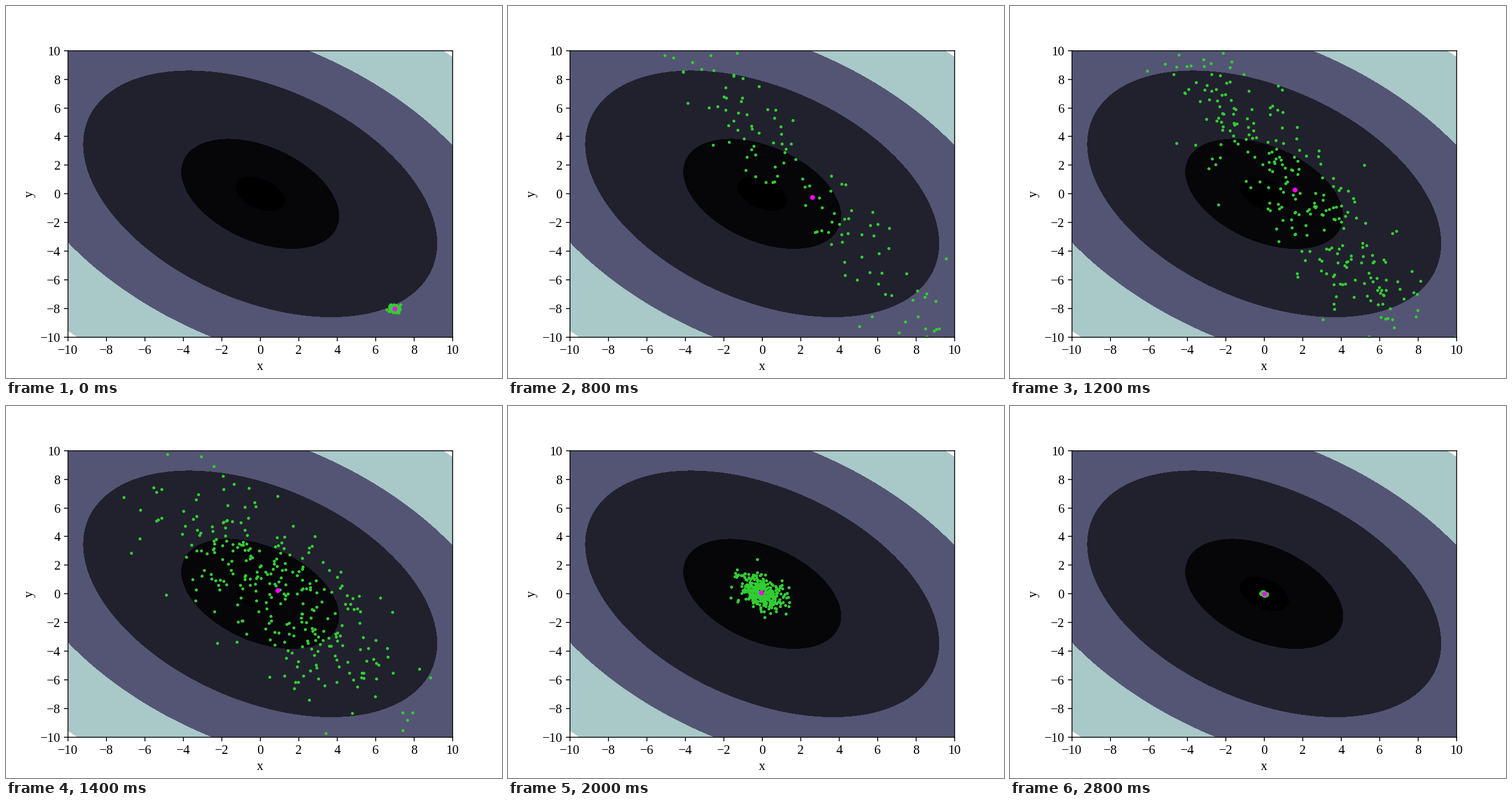
A matplotlib script for the animation above (3 s loop, 864 by 648 pixels).

```python
import numpy as np
import matplotlib.pyplot as plt
from matplotlib.animation import FuncAnimation

plt.rcParams.update({
    "font.family": "Liberation Serif",
    "font.size": 12,
    "axes.unicode_minus": True,
})

POPULATION = 300
GENERATIONS = 15
STEP_MS = 200

# Key generations: the search starts small, stretches, then closes in
KEYS = [0, 2, 4, 6, 8, 10, 14]
MEAN_X = [7, 6.5, 2.6, 1.58, 0.22, -0.05, 0]
MEAN_Y = [-8, -7.1, -0.25, 0.28, 0.25, 0.07, 0]
SPREAD = [0.11, 4.5, 18, 7.5, 2.2, 0.66, 0.06]
ASPECT = [1, 0.55, 0.6, 0.6, 0.95, 1, 1.1]
CORRELATION = [-0.1, -0.97, -0.993, -0.94, -0.5, -0.5, -0.4]


def cost(x, y):
    return 0.7 * x**2 + 0.6 * x * y + 0.8 * y**2


def at(i, values):
    return np.interp(i, KEYS, values)


def mean(i):
    return at(i, MEAN_X), at(i, MEAN_Y)


def sample(i):
    """Draw the population of generation i from a correlated normal."""
    mx, my = mean(i)
    rho = at(i, CORRELATION)
    sy = np.exp(at(i, np.log(SPREAD)))
    sx = sy * at(i, ASPECT)
    u, v = np.random.default_rng(40 + i).standard_normal((2, POPULATION))
    return mx + sx * (rho * v + np.sqrt(1 - rho**2) * u), my + sy * v


fig, ax = plt.subplots(figsize=(6.4, 4.8), dpi=135)
axis = np.linspace(-10, 10, 401)
X, Y = np.meshgrid(axis, axis)
ax.contourf(X, Y, cost(X, Y), levels=[0, 1, 10, 50, 100, 200], cmap="bone")
ticks = range(-10, 11, 2)
ax.set(xlim=(-10, 10), ylim=(-10, 10), xticks=ticks, yticks=ticks,
       xlabel="x", ylabel="y")

cloud, = ax.plot([], [], "o", color="limegreen", ms=2.8, mew=0)
center, = ax.plot([], [], "o", color="magenta", ms=4.5, mew=0)


def update(i):
    mx, my = mean(i)
    cloud.set_data(*sample(i))
    center.set_data([mx], [my])
    return cloud, center


anim = FuncAnimation(fig, update, frames=GENERATIONS,
                     interval=STEP_MS, repeat=True, repeat_delay=0)
plt.show()
```
